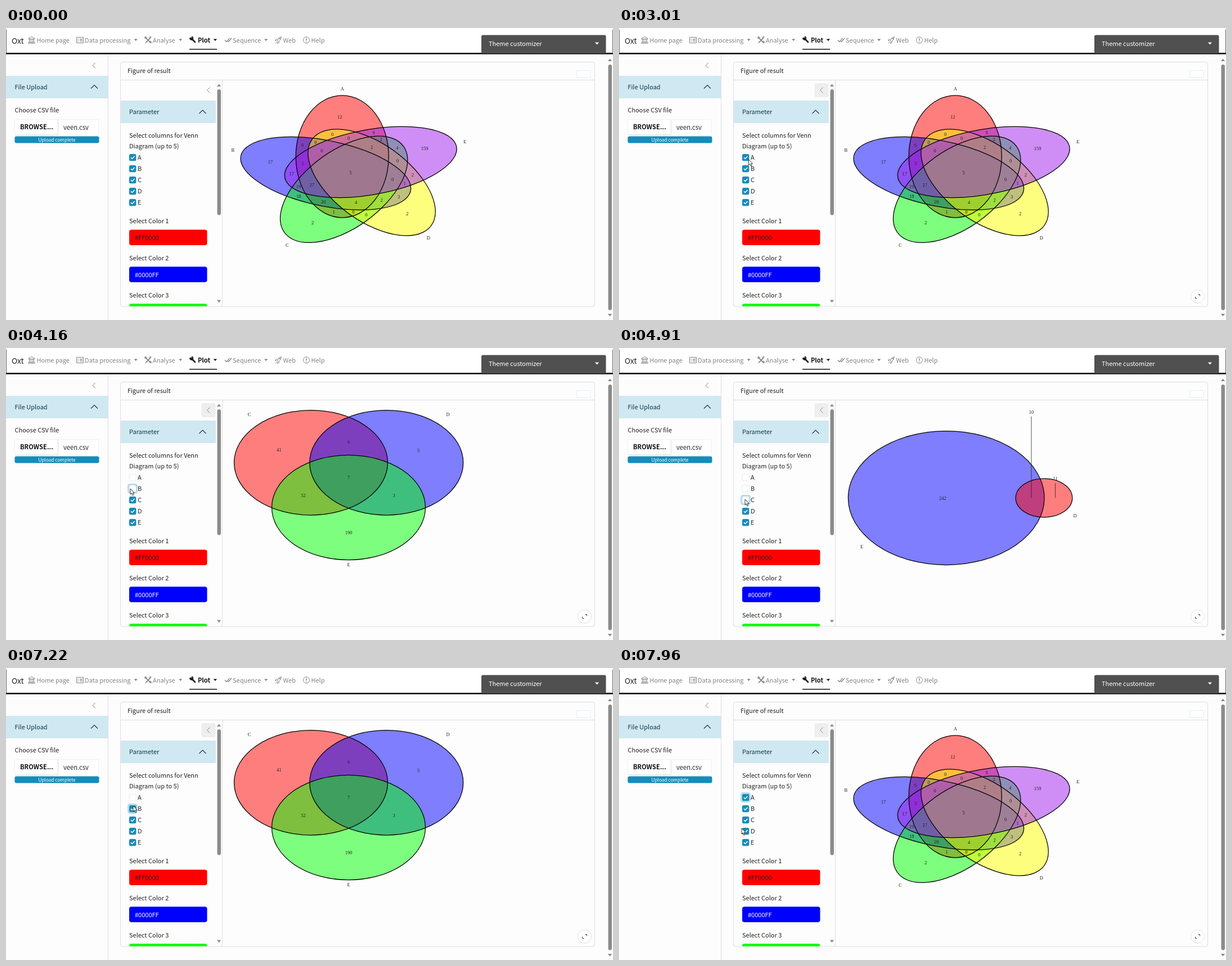
An HTML page for the animation above (8000 ms loop, 1079 px wide and 519 px high).

```html
<!DOCTYPE html>
<html lang="en">
<head>
<meta charset="utf-8">
<title>Venn plot</title>
<style>
  html, body { margin: 0; width: 100%; height: 100%; overflow: hidden; background: #fdfdfd; }
  svg { display: block; width: 100vw; height: 100vh; }
  text { font: 11px "Noto Sans CJK SC", "Noto Sans CJK JP", "Noto Sans CJK", "Open Sans", sans-serif; fill: #222; }
  .bold { font-weight: 700; fill: #111; }
  .nav text:not(.bold), .solid { fill: #828282; }
  .line, .chevron { fill: none; stroke: #828282; }
  .heading { fill: #d0e8f1; }
  .heading + text { fill: #0b3546; }
  .heading ~ .up { stroke: #0b3546; stroke-width: 1.1; }
  .border { fill: none; stroke: #dedede; }
  .venn text { font: 8.5px "Liberation Serif", serif; text-anchor: middle; }
  .venn .fill { fill-opacity: .5; }
  .venn .edge { fill: none; stroke: #000; stroke-width: 1.25; vector-effect: non-scaling-stroke; }
  .venn line { stroke: #222; stroke-width: .8; }
</style>
</head>
<body>
<svg viewBox="0 0 1079 519" preserveAspectRatio="none">
  <!-- navigation bar -->
  <rect width="1079" height="45" fill="#fff"/>
  <rect y="44" width="1079" height="2.7" fill="#17171b"/>
  <path d="M.5 3V45M1078.5 3V45" stroke="#666"/>
  <text x="10" y="28" style="font-size:13.75px">Oxt</text>
  <g class="nav">
    <text x="54.5" y="25.5">Home page</text>
    <text x="140" y="25.5">Data processing</text>
    <text x="261" y="25.5">Analyse</text>
    <text x="341" y="25.5" class="bold">Plot</text>
    <text x="403" y="25.5">Sequence</text>
    <text x="492.5" y="25.5">Web</text>
    <text x="542.5" y="25.5">Help</text>
    <path class="line" d="M40 19.5V18.5L45.500 15.5L51 18.5V19.5ZM41.5 20V25M44 20V25M47 20V25M49.500 20V25M39.5 25.5H51.5M39 27.3H52"/>
    <path class="line" d="M125.5 16.5H137.5V26.5H125.5ZM127.5 19.5H129M131 19.5H136M127.5 21.5H129M131 21.5H136M127.5 23.8H129M131 23.8H136"/>
    <path class="line" stroke-width="1.8" stroke-linecap="round" d="M248 17L257 26M257 17L248.5 26"/>
    <path class="line" d="M246.5 16L249 15.5L249.5 18L247.5 19ZM254.5 18A2.5 2.5 0 0 1 258.5 15.5M255 25L257 23L259 25.5L257.5 27Z"/>
    <path d="M329 18L336 25" stroke="#111" stroke-width="2.6" stroke-linecap="round"/>
    <path d="M327 17.5A2.7 2.7 0 1 0 330 15.5" fill="none" stroke="#111" stroke-width="1.8"/>
    <path class="line" stroke-width="1.2" d="M389 21.5L392 24.5L397.5 18M394.5 23.5L395.5 24.5L401 18"/>
    <path class="line" d="M482 22.5Q484 17 489.5 15.5Q489 21 484.5 24.5ZM482.5 20H479.5L478.5 22.5H481M485 24V26.5L482.5 27.5V25M479 27L481.5 24.5"/>
    <circle class="line" cx="486.5" cy="18.8" r="1"/>
    <circle class="line" cx="534" cy="21.5" r="5.6"/>
    <path class="line" stroke-width="1.3" d="M534 18V22.5M534 23.7V25"/>
    <path class="solid" d="M227.5 19.5h6.4l-3.2 3.5ZM307 19.5h6.4l-3.2 3.5ZM459 19.5h6.4l-3.2 3.5Z"/>
    <path d="M368.7 19.5h6.4l-3.2 3.5Z" fill="#111"/>
    <rect x="326" y="37" width="49" height="1.5" fill="#111"/>
  </g>
  <rect x="845" y="12.5" width="221.5" height="32.5" rx="3" fill="#505050"/>
  <text x="858" y="32" style="fill:#fff">Theme customizer</text>
  <path d="M1047 25.5h7l-3.5 4Z" fill="#fff"/>

  <!-- upload sidebar -->
  <g>
    <path d="M181.5 47V519" class="border"/>
    <path class="chevron" d="M159 61.5l-5 5l5 5"/>
    <rect class="heading" y="85" width="181" height="40"/>
    <text x="15.5" y="109">File Upload</text>
    <path class="chevron up" d="M151 107.5l6 -6l6 6"/>
    <text x="15.5" y="150">Choose CSV file</text>
    <rect x="15.5" y="162.5" width="149" height="28" rx="3" fill="#fff" stroke="#f0f0f0"/>
    <path d="M16 190H92.5V163" fill="none" stroke="#dcdcdc"/>
    <text x="25" y="180" class="bold" style="font-size:11.2px">BROWSE...</text>
    <text x="102" y="181" style="font-size:11.2px">veen.csv</text>
    <rect x="15.5" y="192.5" width="150" height="12" rx="3" fill="#158cba"/>
    <text x="90.5" y="201.5" text-anchor="middle" style="font-size:8.25px;fill:#fff">Upload complete</text>
  </g>

  <!-- result card -->
  <g>
    <rect x="203.5" y="60.5" width="843" height="434.5" rx="4" class="border"/>
    <path d="M204 92.5H1046M384.5 93V495" class="border"/>
    <text x="216" y="80">Figure of result</text>
    <rect x="1014.5" y="75.5" width="24.5" height="13" rx="1.5" fill="#fff" stroke="#e4eef3"/>
    <rect id="collapse" x="347.5" y="98" width="25" height="25" rx="3"/>
    <path class="chevron" d="M362.5 105.5l-5 5l5 5"/>
    <rect class="heading" x="204" y="129" width="169" height="40"/>
    <text x="219" y="153">Parameter</text>
    <path class="chevron up" d="M343.5 152l6 -6l6 6"/>
    <text x="219" y="195">Select columns for Venn</text>
    <text x="219" y="213.5">Diagram (up to 5)</text>
  </g>
  <g id="checks"></g>
  <clipPath id="card"><rect x="204" y="93" width="180" height="401.5"/></clipPath>
  <g id="pickers" clip-path="url(#card)"></g>

  <!-- scrollbars -->
  <g fill="#8b8b8b">
    <rect x="375.5" y="109" width="6.5" height="223.5" rx="3.25"/>
    <path d="M374.8 104h7.4l-3.7 -4.5ZM374.8 483.5h7.4l-3.7 4.5Z"/>
    <rect x="1070.5" y="65" width="6.5" height="436.5" rx="3.25"/>
    <path d="M1069.8 59h7.4l-3.7 -4.5ZM1069.8 508h7.4l-3.7 4.5Z"/>
  </g>

  <g id="plots" class="venn"></g>
  <g id="expand">
    <circle cx="1028.5" cy="477" r="12" fill="#fff" stroke="#e2e2e2"/>
    <path d="M1029.5 473.5h3v3M1024.5 477.5v3h3" fill="none" stroke="#444"/>
  </g>
  <g id="cursor" fill="#fff" stroke="#222" stroke-width=".9" stroke-linejoin="round">
    <path id="arrow" d="M0 0V10L2.3 8L4 12L5.8 11.2L4.1 7.4H7.2Z"/>
    <path id="hand" d="M1 1.3Q2.1 -.2 3 1.3V5L8 6Q9 6.3 8.7 8L8 12.5H2.5L-.8 8.5Q-.8 6.8 1 7.8Z"/>
  </g>
</svg>
<script>
const LOOP = 8000, REDRAW_DELAY = 180;
const NAMES = 'ABCDE';
const COLORS = ['#f00', '#00f', '#0f0', '#ff0', '#a020f0'];
const $ = id => document.getElementById(id);
const radians = degrees => degrees * Math.PI / 180;
const text = (x, y, value) => `<text x="${x}" y="${y}">${value}</text>`;

// Element counts indexed by bit mask: A = 1, B = 2, C = 4, D = 8, E = 16.
const COUNTS = [0, 12, 17, 6, 2, 1, 18, 20, 2, 0, 3, 0, 0, 0, 2, 4,
  159, 9, 17, 5, 4, 2, 19, 27, 2, 0, 1, 0, 0, 2, 0, 5];

const contains = ({ cx, cy, rx, ry, turn = 0, sx = 1, sy = 1 }, x, y) => {
  const u = (x - cx) / sx, v = (y - cy) / sy, c = Math.cos(radians(turn)), s = Math.sin(radians(turn));
  return ((u * c + v * s) / rx) ** 2 + ((v * c - u * s) / ry) ** 2 < 1;
};

// Centre of each region, found by sampling the plot area.
function regionCentres(sets) {
  const regions = {};
  for (let x = 400; x < 820; x += 2) for (let y = 105; y < 395; y += 2) {
    const mask = sets.reduce((m, set) => m | (contains(set, x, y) ? set.bit : 0), 0);
    const region = regions[mask] ??= { x: 0, y: 0, n: 0 };
    region.x += x; region.y += y; region.n++;
  }
  delete regions[0];
  return Object.entries(regions).map(([mask, { x, y, n }]) => ({ mask: +mask, x: x / n, y: y / n }));
}

// "lifts" moves a count above its region on a leader line.
function venn(sets, lifts = {}) {
  const shape = ({ cx, cy, rx, ry, turn = 0, sx = 1, sy = 1 }) =>
    `rx="${rx}" ry="${ry}" transform="translate(${cx} ${cy}) scale(${sx} ${sy}) rotate(${turn})"`;
  const visible = sets.reduce((m, set) => m | set.bit, 0);
  const count = mask => COUNTS.reduce((sum, n, i) => sum + ((i & visible) === mask ? n : 0), 0);
  return '<g>' +
    sets.map(set => `<ellipse class="fill" fill="${set.color}" ${shape(set)}/>`).join('') +
    sets.map(set => `<ellipse class="edge" ${shape(set)}/>`).join('') +
    sets.map(set => text(set.lx, set.ly + 3, NAMES[Math.log2(set.bit)])).join('') +
    regionCentres(sets).map(({ mask, x, y }) => {
      const lift = lifts[mask] || 0;
      const leader = lift ? `<line x1="${x}" x2="${x}" y1="${y}" y2="${y - lift + 8}"/>` : '';
      return leader + text(x, y - lift + 3, count(mask));
    }).join('') + '</g>';
}

const fiveSets = () => venn([0, 70, 145, 215, 287.5].map((tilt, i) => {
  const sx = 344, sy = 236, rx = .24, ry = .46, angle = radians(-20 - 72 * i);
  const cx = 613 + sx * .13 * Math.sin(angle), cy = 257.3 - sy * .13 * Math.cos(angle);
  const reach = 1.11 * ry;
  return { bit: 1 << i, color: COLORS[i], cx, cy, rx, ry, sx, sy, turn: -tilt,
    lx: cx - sx * reach * Math.sin(radians(tilt)), ly: cy - sy * reach * Math.cos(radians(tilt)) };
}));

// Two outer and two inner ellipses, mirrored left and right.
const fourSets = () => venn([0, 1, 2, 3].map(i => {
  const side = i % 2 ? 1 : -1, outer = i < 2, sx = 470, sy = 322;
  return { bit: 2 << i, color: COLORS[i], sx, sy, turn: -45 * side, rx: .35, ry: outer ? .2 : .15,
    cx: 609 + (outer ? .15 * sx * side : 0), cy: outer ? 271 : 239,
    lx: 609 + side * sx * (outer ? .377 : .15), ly: outer ? 168 : 139 };
}));

const threeSets = () => venn([
  { cx: 542, cy: 203.8, lx: 432.5, ly: 117.5 },
  { cx: 676.3, cy: 203.8, lx: 785.5, ly: 117.5 },
  { cx: 609, cy: 283.5, lx: 609, ly: 385 }
].map((set, i) => ({ ...set, bit: 4 << i, color: COLORS[i], rx: 136.5, ry: 93.2 })));

const twoSets = () => venn([
  { bit: 16, color: '#00f', cx: 581.7, cy: 266.5, rx: 174.3, ry: 119, lx: 431.5, ly: 352.5 },
  { bit: 8, color: '#f00', cx: 755.5, cy: 266.5, rx: 50.4, ry: 34.3, lx: 810.5, ly: 298 }
], { 8: 34, 24: 153 });

$('plots').innerHTML = [twoSets, threeSets, fourSets, fiveSets].map(draw => draw()).join('');

$('checks').innerHTML =
  '<rect id="ring" x="216" width="18" height="18" rx="4.5" fill="#b5dbe9"/>' +
  [...NAMES].map((name, i) => `<g transform="translate(219 ${224 + 20 * i})">
    <rect width="12" height="12" rx="2.5" fill="#fff" stroke="#e6e6e6" stroke-width=".8"/>
    <g class="mark"><rect width="12.3" height="12.3" rx="2.5" fill="#158cba"/>
    <path d="M3 6.2L5.3 8.5L9.5 4" fill="none" stroke="#fff" stroke-width="1.5"/></g>
    ${text(15, 10.3, name)}</g>`).join('');

$('pickers').innerHTML = ['#FF0000', '#0000FF', '#00FF00'].map((color, i) =>
  `<g transform="translate(219 ${347 + 65.8 * i})">${text(0, 0, 'Select Color ' + (i + 1))}
    <rect y="11.5" width="138.5" height="27.5" rx="4" fill="${color}"/>
    <text x="10" y="30" style="fill:${i === 1 ? '#fff' : '#222'}">${color}</text></g>`).join('');

// Each click toggles one set: [time, set index].
const CLICKS = [[3300, 0], [3970, 1], [4660, 2], [5940, 2], [7080, 1], [7560, 0]];
// Cursor moves: [start, end, x, y].
const MOVES = [
  [280, 510, 566, 66], [750, 940, 551, 84], [1600, 1820, 366, 120], [1820, 2380, 278, 247],
  [2440, 3100, 228, 233], [3480, 3670, 221, 250], [4160, 4440, 224, 269], [5000, 5380, 225, 285],
  [5620, 5800, 225, 273], [6200, 7080, 226, 245], [7300, 7520, 224, 229], [7760, 7960, 218, 285]
];

const progress = (t, start, end) => Math.min(1, Math.max(0, (t - start) / (end - start)));
const smooth = p => p * p * (3 - 2 * p);
const cursorAt = t => MOVES.reduce(([x, y], [start, end, toX, toY]) => {
  const p = smooth(progress(t, start, end));
  return [x + (toX - x) * p, y + (toY - y) * p];
}, [567, 1]);

const clicksBefore = t => CLICKS.filter(([time]) => time <= t);
const checkedAt = t => [...NAMES].map((_, i) => clicksBefore(t).filter(([, set]) => set === i).length % 2 === 0);

const show = (element, visible) => element.setAttribute('visibility', visible ? 'visible' : 'hidden');
const plots = [...$('plots').children];
const marks = [...document.querySelectorAll('.mark')];

function render(t) {
  const plotted = checkedAt(t - REDRAW_DELAY).filter(Boolean).length;
  plots.forEach((plot, i) => show(plot, i + 2 === plotted));
  checkedAt(t).forEach((checked, i) => show(marks[i], checked));

  const focus = clicksBefore(t).at(-1);
  show($('ring'), focus);
  if (focus) $('ring').setAttribute('y', 221 + 20 * focus[1]);

  const entered = t >= 1780, hovering = entered && t < 1900;
  $('collapse').setAttribute('fill', hovering ? '#d6d6d6' : entered ? '#eee' : 'none');
  $('expand').setAttribute('opacity', progress(t, 280, 480));

  $('cursor').setAttribute('transform', `translate(${cursorAt(t)})`);
  show($('arrow'), t >= 280 && !hovering);
  show($('hand'), hovering);
}

const start = performance.now();
function frame() {
  render((performance.now() - start) % LOOP);
  requestAnimationFrame(frame);
}
frame();
</script>
</body>
</html>
```
